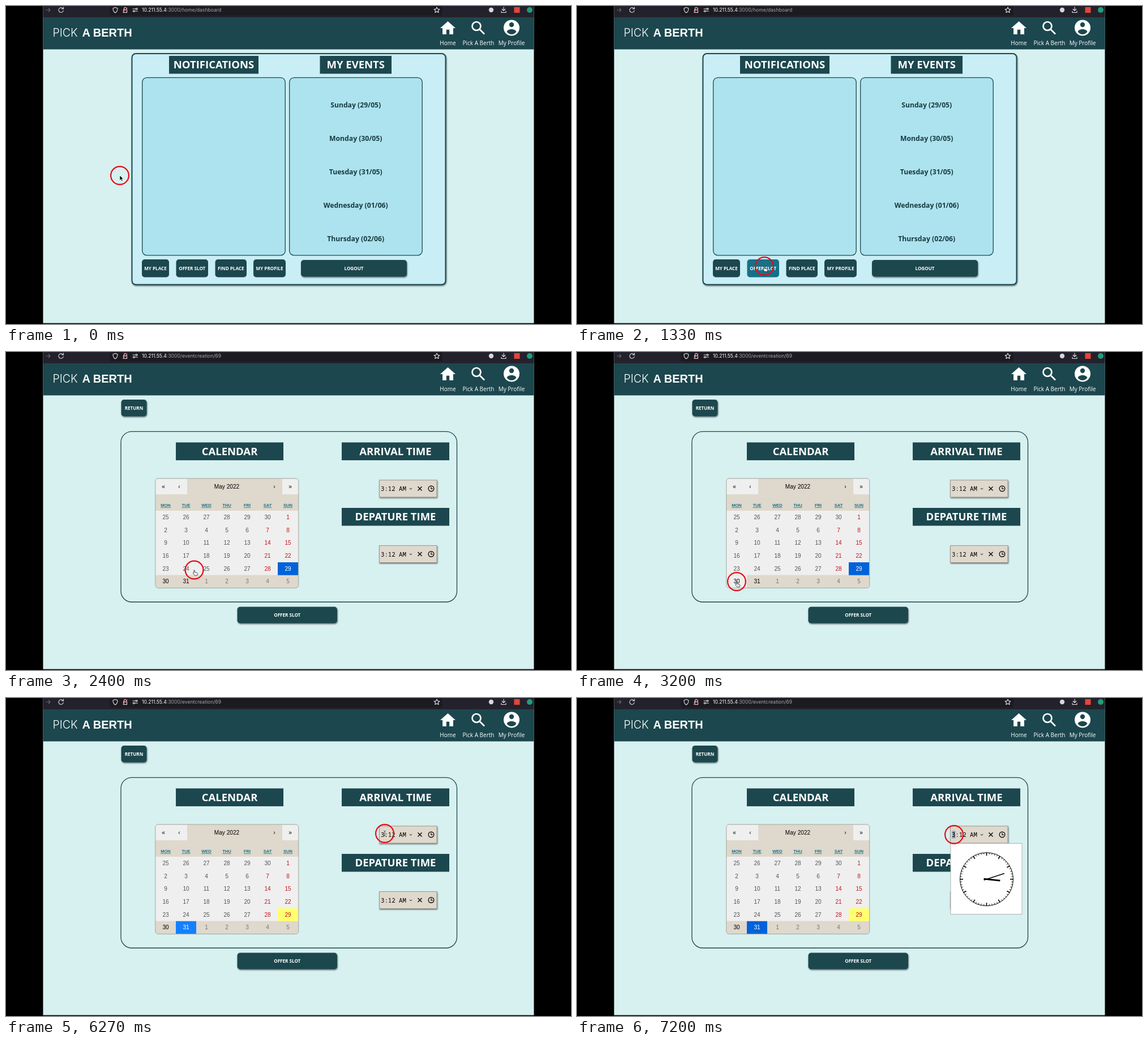
An HTML page that plays this animation: 998 px wide and 561 px high, repeating every 8 s.

```html
<!DOCTYPE html>
<html lang="en">
<head>
<meta charset="utf-8">
<title>Offer a slot</title>
<style>
  html, body { margin: 0; width: 100%; height: 100%; overflow: hidden; background: #000; }
  svg { display: block; width: 998px; height: 561px; }
  text { font-family: "Open Sans", "Noto Sans", sans-serif; text-anchor: middle; white-space: pre; }
  .head { font-size: 18.5px; font-weight: 700; fill: #fff; }
  .btn { font-size: 8.1px; font-weight: 700; fill: #fff; }
  .day { font-size: 12.2px; font-weight: 700; fill: #173b42; }
  .nav { font-size: 10px; fill: #fff; }
  .cal { font: 10.1px "Liberation Sans", Arial, sans-serif; }
  .week { font: 700 7.6px "Liberation Sans", Arial, sans-serif; fill: #1b7186; text-decoration: underline; }
  .time { font: 10.7px "Noto Sans Mono", monospace; text-anchor: start; }
  .url { font: 8.6px Inter, sans-serif; text-anchor: start; fill: #a3a3ab; }
  .icon { fill: none; stroke: #e4e4ea; stroke-width: 1.1; stroke-linecap: round; stroke-linejoin: round; }
</style>
</head>
<body>
<svg viewBox="0 0 998 561">
  <defs>
    <filter id="shadow" x="-10%" y="-10%" width="120%" height="130%">
      <feDropShadow dx=".8" dy="1.5" stdDeviation="1" flood-color="#000" flood-opacity=".55"/>
    </filter>
  </defs>
  <rect x="65.5" width="867" height="559.5" fill="#d7f0f0"/>

  <!-- browser bar -->
  <rect x="65.5" width="867" height="20" fill="#23222c"/>
  <rect x="183" y="-6" width="588" height="23" rx="3" fill="#1c1b22"/>
  <g class="icon">
    <path d="M71 7h7m-3-3 3 3-3 3" stroke="#66666f"/>
    <path d="M100.500 4.500a4.200 4.200 0 1 0 .8 3.500M101.500 2v3h-3"/>
    <path d="M193 2.500l4 1.500c0 4-1 6.500-4 8-3-1.500-4-4-4-8z"/>
    <path d="M207.500 6.500h6v5h-6zM208.500 6.500v-2a2 2 0 0 1 4 0v2"/>
    <path d="M206.500 11.500l8-8" stroke="#f0506a"/>
    <path d="M224 5h5m3 0h.5M224 9h.5m3 0h5"/>
    <circle cx="230.500" cy="5" r="1.300"/><circle cx="226" cy="9" r="1.300"/>
    <path d="M761 2.200l1.500 3.100 3.400.4-2.500 2.300.7 3.400-3.100-1.700-3.100 1.700.7-3.400-2.500-2.300 3.400-.4z"/>
    <path d="M879 2v6m-2.800-2.500L879 8.300l2.800-2.800M875 9v2.500h8V9"/>
  </g>
  <circle cx="857" cy="7" r="4.200" fill="#d6d6dd"/>
  <rect x="897.500" y="2" width="10" height="10" fill="#e3453b"/>
  <circle cx="925" cy="7" r="5" fill="#1f9d7c"/>
  <text class="url" x="240" y="10"><tspan fill="#fbfbfe">10.211.55.4</tspan><tspan id="path"></tspan></text>

  <!-- site header -->
  <rect x="65.5" y="20" width="867" height="56.500" fill="#1c474e"/>
  <text x="82.500" y="53.500" fill="#fff" style="font:300 19.500px Inter,sans-serif;text-anchor:start">PICK</text>
  <text x="134.500" y="53.500" fill="#fff" style="font:700 20px 'Liberation Sans',Arial,sans-serif;text-anchor:start">A BERTH</text>
  <path transform="translate(764.300 22.900) scale(1.350)" d="M10 20v-6h4v6h5v-8h3L12 3 2 12h3v8z" fill="#fff"/>
  <g fill="none" stroke="#fff" stroke-width="2.700">
    <circle cx="831" cy="35.500" r="7.500"/><path d="M836.500 41l8.500 8.500"/>
  </g>
  <circle cx="893" cy="38.500" r="14" fill="#fff"/>
  <circle cx="893" cy="33" r="4.200" fill="#1c474e"/>
  <path d="M884.700 45.500c1-6 15.600-6 16.600 0a10 10 0 0 1-16.600 0z" fill="#1c474e"/>
  <text class="nav" x="780.500" y="69">Home</text>
  <text class="nav" x="834.500" y="69">Pick A Berth</text>
  <text class="nav" x="893" y="69">My Profile</text>

  <g id="dashboard"></g>
  <g id="creation"></g>

  <g id="pointer">
    <path id="arrow" d="M0 0v8.500l2-1.800 1.500 3.200 1.500-.7-1.500-3.100h2.700z" fill="#000" stroke="#fff" stroke-width=".6"/>
    <path id="hand" d="M-.8 1.500c0-1.500 1.800-1.500 1.800 0v2.800l3.700.8c1 .2 1.300.8 1.100 1.700L5.200 9.500H.7L-2 6.200c-.5-1 .4-1.400 1.200-.7z" fill="#fff" stroke="#222" stroke-width=".8"/>
    <path id="beam" d="M-1.500-4.500q1.500 0 1.500 1v7q0 1-1.500 1M1.500-4.500Q0-4.500 0-3.500M1.500 4.500Q0 4.500 0 3.500" fill="none" stroke="#222" stroke-width=".8"/>
    <circle r="15.900" fill="none" stroke="#e60a14" stroke-width="2.200"/>
  </g>
</svg>
<script>
const $ = id => document.getElementById(id);
const DARK = '#1c474e', BEIGE = '#dfd8cc', PALE = '#efefef';

const rect = (x, y, w, h, fill, extra = '') =>
  `<rect x="${x}" y="${y}" width="${w}" height="${h}" fill="${fill}" ${extra}/>`;
const text = (s, x, y, cls, extra = '') =>
  `<text x="${x}" y="${y}" class="${cls}" ${extra}>${s}</text>`;
const heading = (s, x, y, w) =>
  rect(x, y, w, 31.5, DARK) + text(s, x + w / 2, y + 22, 'head');
const button = (s, x, y, w, h, extra = '') =>
  rect(x, y, w, h, DARK, 'rx="5" ' + extra) + text(s, x + w / 2, y + h / 2 + 3, 'btn');
const raised = 'filter="url(#shadow)"';

// Dashboard
const panel = (x, w) => rect(x, 126.3, w, 313.5, '#ade3ee', `rx="8" stroke="${DARK}" stroke-width="1.3"`);
const days = ['Sunday (29/05)', 'Monday (30/05)', 'Tuesday (31/05)', 'Wednesday (01/06)', 'Thursday (02/06)'];
$('dashboard').innerHTML =
  rect(222.5, 84, 554, 407.5, '#c9eef5', `rx="7" stroke="${DARK}" stroke-width="2" ${raised}`) +
  heading('NOTIFICATIONS', 288, 88, 158) + heading('MY EVENTS', 554.5, 88, 126.5) +
  panel(240.7, 252.5) + panel(500.7, 234.5) +
  days.map((d, i) => text(d, 617.7, 178.5 + i * 59, 'day')).join('') +
  button('MY PLACE', 240, 447, 48, 31.5) +
  button('OFFER SLOT', 300.5, 447, 56.5, 31.5, 'id="offer"') +
  button('FIND PLACE', 369.5, 447, 55.5, 31.5) +
  button('MY PROFILE', 437, 447, 57, 31.5) +
  button('LOGOUT', 521, 448, 187, 29.5, raised);

// Slot creation page
function calendar() {
  let s = rect(264, 223, 253, 193.3, BEIGE, 'rx="5"') +
    rect(264, 223.5, 56, 27.5, PALE) + rect(488, 223.5, 28.5, 27.5, PALE) +
    rect(264, 280, 252.5, 113.5, PALE);
  [['«', 278], ['‹', 306], ['May 2022', 390], ['›', 474], ['»', 502]]
    .forEach(([c, x]) => s += text(c, x, 241, 'cal'));
  ['MON', 'TUE', 'WED', 'THU', 'FRI', 'SAT', 'SUN']
    .forEach((d, i) => s += text(d, 282 + i * 36, 273, 'week'));
  s += rect(264, 393.7, 36, 22.3, PALE, 'id="hover"') +
    rect(480, 371, 36, 22.7, '', 'id="today"') +
    rect(300, 393.7, 36, 22.5, '', 'id="picked"');
  for (let i = 0; i < 42; i++) {
    const n = i < 6 ? 25 + i : i < 37 ? i - 5 : i - 36;
    const weekend = i % 7 > 4 && i > 5 && i < 37;
    const fill = weekend ? '#c4161c' : i === 35 || i === 36 ? '#000' : i > 36 ? '#777' : '#555';
    s += text(n, 282 + i % 7 * 36, 294.8 + Math.floor(i / 7) * 22.7, 'cal', `id="d${i}" fill="${fill}"`);
  }
  return s + rect(263.8, 223, 253, 193.3, 'none', 'rx="5" stroke="#a0a096" stroke-width=".9"');
}

const timeInput = (y, mark = '') =>
  rect(659.5, y, 101.5, 30, BEIGE, `stroke="#8d8a83" stroke-width=".8" ${raised}`) + mark +
  text('3:12 AM', 662, y + 19, 'time') +
  `<g transform="translate(715 ${y + 15})" fill="none" stroke="#111">
    <path d="M-2.200-.8 0 1.300 2.200-.8"/><path d="M12.500-3.500l7 7m0-7-7 7" stroke-width="1.500"/>
    <circle cx="36" r="4.800" stroke-width="1.400"/><path d="M36-3v3.300h3" stroke-width="1.200"/></g>`;

function clock() {
  const hand = (deg, len, w) =>
    `<path d="M0 5V${-len}" stroke-width="${w}" transform="rotate(${deg})"/>`;
  let s = '<circle r="47"/>';
  for (let i = 0; i < 60; i++) {
    const hour = i % 5 === 0;
    s += `<path d="M0-47v${hour ? 5.5 : 3}" stroke-width="${hour ? 1.6 : .8}" transform="rotate(${i * 6})"/>`;
  }
  return rect(660, 256.5, 126, 125, '#fff', 'stroke="#aaa" stroke-width=".9"') +
    `<g transform="translate(723.500 319.700)" fill="none" stroke="#000">${s}${hand(96, 24, 2.8)}${hand(72, 33, 1.4)}</g>`;
}

$('creation').innerHTML =
  button('RETURN', 203.5, 84, 45, 29.5, raised) +
  rect(203, 140.3, 593.5, 300.7, 'none', `rx="19" stroke="${DARK}" stroke-width="1.3"`) +
  heading('CALENDAR', 300, 159.5, 190) + heading('ARRIVAL TIME', 593, 159.5, 190) +
  heading('DEPATURE TIME', 593, 275, 190) + calendar() +
  timeInput(226, rect(662, 234, 6.5, 14, '#9fb4cb', 'id="mark"')) + timeInput(341.5) +
  button('OFFER SLOT', 408.5, 449.5, 176.5, 29, raised) +
  `<g id="popup">${clock()}</g>`;

// Pointer stops: [step, x, y], 15 steps per second
const STOPS = [
  [0, 201, 299], [2, 201, 299], [5, 328, 397], [7, 328, 397], [12, 331, 459], [28, 331, 459],
  [32, 317, 396], [35, 317, 396], [37, 348, 373], [41, 348, 373], [44, 308, 402], [46, 308, 402],
  [48, 282, 405], [79, 282, 405], [80, 302, 404], [82, 316, 404], [90, 316, 404],
  [94, 669, 239], [98, 742, 234], [102, 666, 241], [121, 666, 241]
];
const OPEN = 23, PICK = 86, FOCUS = 108;

function pointerAt(step) {
  const i = STOPS.findIndex(s => s[0] > step);
  const [a, ax, ay] = STOPS[i - 1], [b, bx, by] = STOPS[i];
  const p = (step - a) / (b - a);
  return [ax + (bx - ax) * p, ay + (by - ay) * p];
}

const show = (id, on) => $(id).style.display = on ? '' : 'none';
const paint = (id, fill) => $(id).setAttribute('fill', fill);

function draw(step) {
  const [x, y] = pointerAt(step);
  const created = step >= OPEN, picked = step >= PICK, focused = step >= FOCUS;
  const onOffer = !created && y > 447;
  const onGrid = created && x > 264 && x < 516 && y > 280 && y < 416;
  const onTime = created && x > 655 && x < 710 && y > 226 && y < 256;
  const onLastRow = onGrid && y > 394;

  show('dashboard', !created);
  show('creation', created);
  $('path').textContent = created ? ':3000/eventcreation/69' : ':3000/home/dashboard';
  paint('offer', onOffer ? '#167188' : DARK);

  show('hover', onLastRow);
  if (onLastRow) $('hover').setAttribute('x', 264 + 36 * Math.floor((x - 267) / 36));
  paint('today', picked ? '#ffff70' : '#0062d9');
  paint('d34', picked ? '#c4161c' : '#fff');
  show('picked', picked);
  paint('picked', focused ? '#0062d9' : '#1480ff');
  paint('d36', picked ? '#fff' : '#000');
  show('popup', focused);
  show('mark', focused);

  show('hand', onOffer || onGrid);
  show('beam', onTime);
  show('arrow', !onOffer && !onGrid && !onTime);
  $('pointer').setAttribute('transform', `translate(${x} ${y})`);
}

function tick() {
  draw(Math.floor((performance.now() % 8000 + 5) * 15 / 1000));
  requestAnimationFrame(tick);
}
tick();
</script>
</body>
</html>
```
